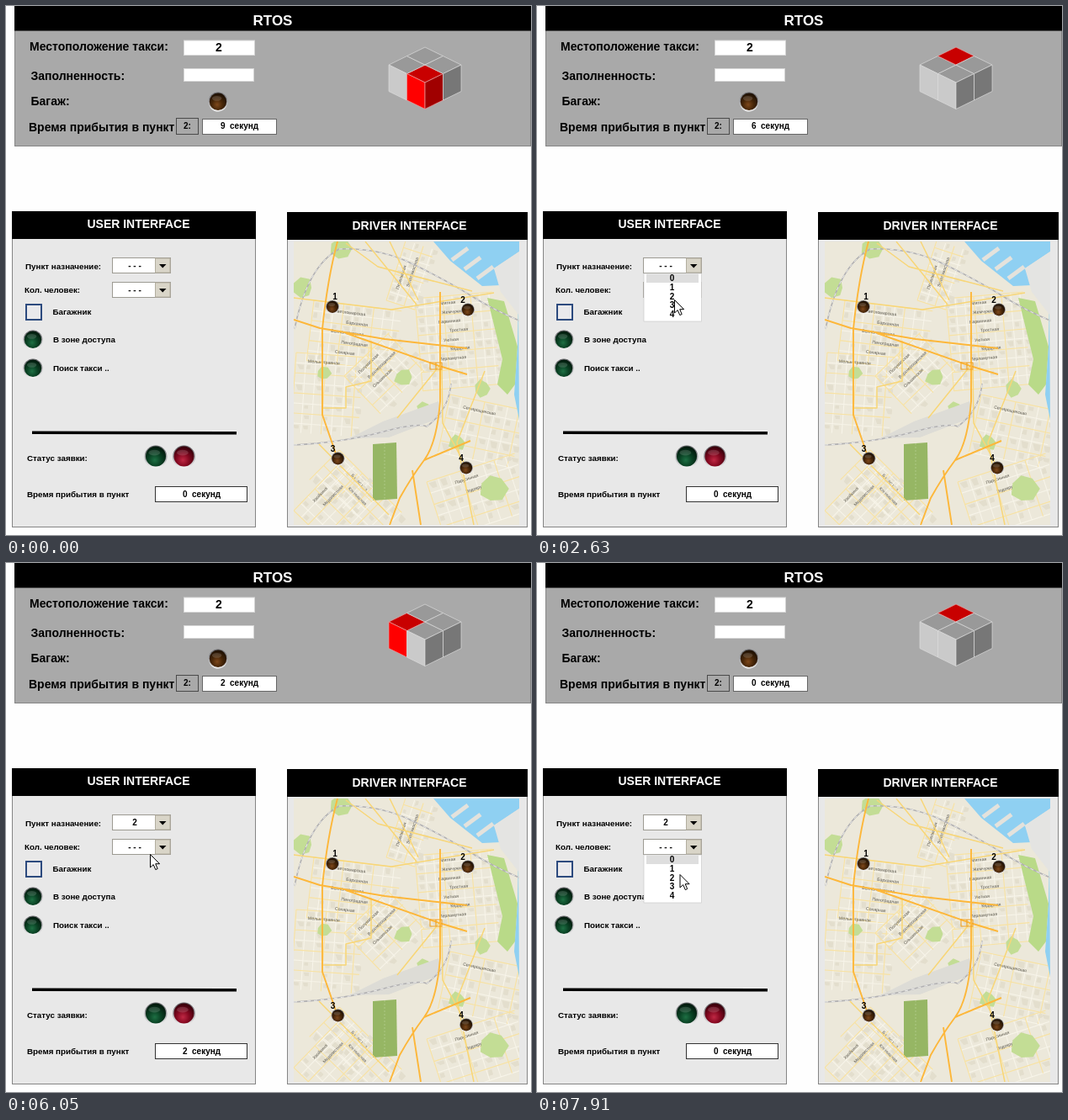
These frames come from a looping animation (624 by 629 pixels, 8 s). An HTML page:

```html
<!DOCTYPE html>
<html lang="ru">
<head>
<meta charset="utf-8">
<title>RTOS</title>
<style>
html, body { margin: 0; width: 100%; height: 100%; overflow: hidden; background: #fefefe; }
svg { display: block; width: 624px; height: 629px; }
text { font-family: "Liberation Sans", Arial, sans-serif; font-weight: bold; white-space: pre; }
#map text { font-weight: normal; font-size: 5.2px; fill: #5c594f; }
#map path { stroke-linejoin: round; }
</style>
</head>
<body>
<svg viewBox="0 0 624 629" xmlns="http://www.w3.org/2000/svg">
  <defs id="defs">
    <clipPath id="mapBox"><rect x="342" y="280" width="268" height="337"/></clipPath>
    <linearGradient id="rim" x1="0" y1="0" x2="0" y2="1">
      <stop offset="0" stop-color="#606064"/><stop offset=".5" stop-color="#a4a4a8"/><stop offset="1" stop-color="#f4f4f4"/>
    </linearGradient>
  </defs>
  <g id="panels"></g>
  <g id="map" clip-path="url(#mapBox)"></g>
  <g id="widgets"></g>
  <g id="cube" stroke-width=".7" stroke-linejoin="round"></g>
  <g id="lists"></g>
  <circle id="click" r="12.5" fill="#f7ea1c" opacity=".72"/>
  <path id="arrow" d="M.5 .5V16L4.2 12.6 6.8 18.6 9.2 17.5 6.7 11.7H11.6Z" fill="#fff" stroke="#000"/>
</svg>
<script>
const $ = id => document.getElementById(id);

function add(parent, tag, attrs, text) {
  const el = document.createElementNS('http://www.w3.org/2000/svg', tag);
  for (const k in attrs) el.setAttribute(k, attrs[k]);
  if (text !== undefined) el.textContent = text;
  parent.appendChild(el);
  return el;
}
const box = (p, x, y, width, height, fill, stroke = 'none', sw = 1) =>
  add(p, 'rect', { x, y, width, height, fill, stroke, 'stroke-width': sw });
const label = (p, x, y, size, str, anchor = 'start', fill = '#000') =>
  add(p, 'text', { x, y, 'font-size': size, 'text-anchor': anchor, fill }, str);
const shape = (p, points, fill) => add(p, 'polygon', { points, fill });
const line = (p, d, stroke, width, dash = 'none') =>
  add(p, 'path', { d, fill: 'none', stroke, 'stroke-width': width, 'stroke-dasharray': dash });

// Lamps
const lampColors = {
  brown: ['#7d481c', '#472608', '#211204'],
  green: ['#1e7044', '#0a4224', '#031c0e'],
  red: ['#c02844', '#840820', '#3c000c']
};
for (const id in lampColors) {
  const g = add($('defs'), 'radialGradient', { id, cx: .45, cy: .68, r: .62 });
  lampColors[id].forEach((c, i) => add(g, 'stop', { offset: i / 2, 'stop-color': c }));
}
function lamp(p, cx, cy, r, color) {
  add(p, 'circle', { cx, cy, r, fill: 'url(#rim)' });
  add(p, 'circle', { cx, cy: cy - r * .03, r: r * .89, fill: `url(#${color})` });
  add(p, 'ellipse', { cx: cx - r * .12, cy: cy - r * .36, rx: r * .5, ry: r * .25, fill: '#fff', opacity: .15 });
}

// Panels
const panels = $('panels');
function panel(x, y, w, h, bar, fill, size, title, tx, ty) {
  box(panels, x + .5, y + .5, w - 1, h - 1, fill, '#858585');
  box(panels, x, y, w, bar, '#000');
  label(panels, tx, ty, size, title, 'middle', '#fff');
}
panel(10, 0, 614, 167, 29.5, '#a9a9a9', 17, 'RTOS', 317, 23);
panel(7, 244, 290, 376, 33, '#e8e8e8', 14, 'USER INTERFACE', 157.5, 264);
panel(334, 245, 286, 375, 33, '#e8e8e8', 14, 'DRIVER INTERFACE', 479.5, 266);

// City map
const map = $('map');
let seed = 7;
const rnd = (lo = 0, hi = 1) => lo + (hi - lo) * (seed = seed * 16807 % 2147483647) / 2147483647;

box(map, 342, 280, 268, 337, '#ece8da');

// A district: house blocks, white lanes, a few yellow streets and their names
function district(x, y, w, h, angle, step, names) {
  const g = add(map, 'g', { transform: `translate(${x} ${y}) rotate(${angle})` });
  let blocks = '', lanes = '', streets = '';
  for (let i = 0; i <= w; i += step) {
    for (let j = 0; j < h; j += step)
      if (rnd() < .6) blocks += `M${i + 2} ${j + 2}h${step * rnd(.3, .7)}v${step * rnd(.3, .6)}h${-step * .4}z`;
    if (i % (step * 3)) lanes += `M${i} 0V${h}`;
    else streets += `M${i} 0V${h}`;
  }
  for (let j = 0; j <= h; j += step) {
    if (j % (step * 2)) lanes += `M0 ${j}H${w}`;
    else streets += `M0 ${j}H${w}`;
  }
  add(g, 'path', { d: blocks, fill: '#e3decd' });
  line(g, lanes, '#f8f5ea', 1);
  line(g, streets, '#f8e2a2', 1.1);
  names.split(' ').forEach((s, i) => label(g, w * .42 + i % 2 * 10, step * (i + 1) - 1, 5, s, 'middle'));
}
district(486, 348, 92, 110, -5, 11, 'Мятная Жемчужинская Барвинная Тростная Уютная Кедарная Перламутная');
district(366, 350, 105, 72, 7, 12, 'Светломарская Барханная Волнолетовская Пеноградная Сонярная');
district(452, 350, 75, 36, -72, 11, 'Переливная Золотомостная');
district(345, 412, 80, 95, 4, 12, 'Мельнотравная');
district(402, 440, 74, 62, -44, 12, 'Полумарская Верхнерощинская Ольшинская');
district(396, 528, 105, 50, 45, 13, 'Берестная Клёнышная');
district(342, 600, 84, 60, -46, 12, 'Хвойкина Медолистная');
district(528, 462, 90, 70, 12, 14, 'Семирощинская');
district(500, 566, 110, 70, -18, 14, 'Парусинная Водокрутная');

// Parks
function park(x, y, r) {
  const points = Array.from({ length: 7 }, (_, i) => {
    const a = i / 7 * Math.PI * 2, d = r * rnd(.75, 1.15);
    return `${x + d * Math.cos(a)},${y + d * Math.sin(a)}`;
  });
  shape(map, points.join(' '), '#c3dd95');
}
[[398, 288, 12], [353, 335, 13], [472, 441, 11], [377, 437, 9], [497, 480, 9], [566, 455, 11], [536, 519, 10], [579, 574, 17]]
  .forEach(p => park(...p));
shape(map, '572,347 592,351 608,405 605,450 596,462 584,450 590,420', '#b9da88');
shape(map, '436,521 464,519 465,586 436,588', '#96b664');
line(map, 'M450 520V587', '#aec886', 1, '2 2');

// Harbour
shape(map, '508,280 610,280 610,292 580,312 588,332 566,333 528,303', '#8fd0f2');
shape(map, '609,345 610,492 604,462 608,405', '#8fd0f2');
shape(map, '580,312 610,292 610,368 588,340', '#e4e4e2');
for (let i = 0; i < 3; i++) line(map, `M${530 + i * 15} ${302 + i * 11}l19 -14`, '#e4e2dc', 5);

// Railway and main roads
shape(map, '408,514 448,494 514,470 518,489 455,513', '#dddcd6');
const rail = 'M343 384Q358 309 396 289Q443 287 484 307T552 344T610 374M342 522Q400 519 445 507T500 500Q526 481 529 449';
line(map, rail, '#b2b1b3', 1.6);
line(map, rail, '#f6f6f4', .9, '4 4');
line(map, 'M427 280L488 355M456 280L490 350M342 347L458 361L580 341M404 282L442 310L554 339M518 432L519 496L548 550' +
  'M515 428L465 490M434 398V446L404 453V478H376M569 434L536 519L556 617M372 521L455 605', '#f8d677', 1.5);
line(map, 'M394 280Q382 325 376 384V486L394 538M342 373L373 383L450 396L548 407M404 389L515 428L548 438' +
  'M516 340V470Q512 520 497 540T468 585L456 617M483 552L493 617M497 540L552 517', '#fdb73a', 1.9);
line(map, 'M504 424h14v8h-14zM511 424v8', '#f0a01e', 1.1);

// Controls
const ui = $('widgets');
[[388, 358, 1], [549, 361.5, 2], [394.5, 538.5, 3], [547, 549.5, 4]].forEach(([x, y, n]) => {
  lamp(ui, x, y, 8, 'brown');
  label(ui, x - (n === 1 ? -3 : 6), y - 9, 10, n, 'middle');
});

label(ui, 28, 53, 14, 'Местоположение такси:');
label(ui, 29.5, 88, 14, 'Заполненность:');
label(ui, 29.5, 118, 14, 'Багаж:');
label(ui, 27, 149, 14, 'Время прибытия в пункт');
box(ui, 211.5, 41, 84, 17.5, '#fff', '#d6d6d6');
label(ui, 253, 53.5, 14, '2', 'middle');
box(ui, 211.5, 74.5, 83, 15, '#fff', '#d6d6d6');
lamp(ui, 252, 114, 11.5, 'brown');
box(ui, 202.5, 133.5, 26, 19, '#a9a9a9', '#4a4a4a');
label(ui, 215.5, 146, 10, '2:', 'middle');
box(ui, 233.5, 134.5, 88, 18, '#fff', '#666');

label(ui, 23, 313, 9.8, 'Пункт назначение:');
label(ui, 22, 341, 9.8, 'Кол. человек:');
label(ui, 55.5, 367, 9.8, 'Багажник');
label(ui, 56, 400, 9.8, 'В зоне доступа');
label(ui, 56, 434, 9.8, 'Поиск такси ..');
label(ui, 25, 541, 9.8, 'Статус заявки:');
label(ui, 25, 584, 9.8, 'Время прибытия в пункт');
box(ui, 24, 355, 18, 18, '#e9e9ec', '#2c4a7e', 2);
lamp(ui, 32, 397, 11.5, 'green');
lamp(ui, 32, 431, 11.5, 'green');
lamp(ui, 178, 536, 13.5, 'green');
lamp(ui, 211.5, 536, 13.5, 'red');
shape(ui, '31,505.5 274,506 274,509.5 31,509', '#000');
box(ui, 177.5, 571.5, 109, 18, '#fff', '#333');

function combo(y) {
  box(ui, 126.5, y + .5, 69, 18, '#fff', '#9c9a92');
  box(ui, 177.5, y + 1, 17.5, 17, '#d9d5c8', '#b3ae9f');
  shape(ui, `182,${y + 8} 190.5,${y + 8} 186.2,${y + 12.5}`, '#000');
  return label(ui, 153, y + 13, 10, '- - -', 'middle');
}
function menu(y) {
  const g = add($('lists'), 'g', {});
  box(g, 127, y, 68.5, 57, '#fff', '#c4c4c4', .6);
  box(g, 130, y + .5, 62, 10.5, '#dedede');
  for (let i = 0; i < 5; i++) label(g, 160.5, y + 9 + i * 10.8, 10, i, 'middle');
  return g;
}
const place = combo(299);
combo(328);
const placeMenu = menu(318), peopleMenu = menu(347);
const taxiTime = label(ui, 277.5, 146, 10, '', 'middle');
const userTime = label(ui, 232.5, 584, 10, '', 'middle');

// Cube: pieces light up in the order front, left, back, right
const W = 21.5, H = 10.5, D = 31.5;
const sides = {
  top: { grey: '#999', lit: '#c80000', d: `l${W} ${H} ${-W} ${H} ${-W} ${-H}z` },
  left: { grey: '#cacaca', lit: '#f00', d: `l${W} ${H}v${D}l${-W} ${-H}z` },
  right: { grey: '#777', lit: '#a00000', d: `l${W} ${-H}v${D}l${-W} ${H}z` }
};
// side, piece, and start measured in half-widths from the centre of the top
const faces = [
  ['top', 0, 0, 0], ['top', 1, -1, -1], ['top', 2, 0, -2], ['top', 3, 1, -1],
  ['left', 1, -2, 0], ['left', 0, -1, 1], ['right', 0, 0, 2], ['right', 3, 1, 1]
].map(([side, piece, i, j]) => ({
  ...sides[side], piece,
  el: add($('cube'), 'path', { d: `M${498 + i * W} ${70 + j * H}${sides[side].d}` })
}));

// Timeline
const LOOP = 8000, SECOND = 988, TURN = 1200;
const OPEN_PLACE = 1660, PICK_PLACE = 5640, OPEN_PEOPLE = 6840, CLICK = 160;

// Cursor: start and end time of each move, then where it ends
const moves = [
  [200, 770, 247, 328], [770, 960, 241, 325], [1090, 1500, 181, 308], [1990, 2600, 163, 349], [2910, 4110, 170, 354],
  [5080, 5180, 171, 346], [6050, 6640, 183.5, 334], [7120, 7480, 169, 374], [7480, 7680, 169.5, 370]
];
function cursorAt(t) {
  let x = 259, y = 629;
  for (const [from, to, mx, my] of moves) {
    const k = Math.min(1, Math.max(0, (t - from) / (to - from)));
    const e = k * k * (3 - 2 * k);
    x += (mx - x) * e;
    y += (my - y) * e;
  }
  return [x, y];
}
const show = (el, on) => el.setAttribute('visibility', on ? 'visible' : 'hidden');
const during = (t, a, b) => t >= a && t < b;

function draw(t) {
  const left = 9 - (t >= 200) - Math.floor(t / SECOND);
  const picked = t >= PICK_PLACE;
  taxiTime.textContent = `${left}  секунд`;
  userTime.textContent = `${picked ? left : 0}  секунд`;
  place.textContent = picked ? '2' : '- - -';
  show(placeMenu, during(t, OPEN_PLACE, PICK_PLACE));
  show(peopleMenu, t >= OPEN_PEOPLE);

  const active = Math.floor((t + 360) / TURN) % 4;
  for (const f of faces) {
    const on = f.piece === active;
    f.el.setAttribute('fill', on ? f.lit : f.grey);
    f.el.setAttribute('stroke', on ? '#e8a0a0' : '#dcdcdc');
  }

  const [x, y] = cursorAt(t);
  $('arrow').setAttribute('transform', `translate(${x} ${y})`);
  $('click').setAttribute('cx', x);
  $('click').setAttribute('cy', y + .5);
  show($('arrow'), t >= 200);
  show($('click'), [OPEN_PLACE, PICK_PLACE].some(end => during(t, end - CLICK, end)));
}

const start = performance.now();
function frame() {
  draw((performance.now() - start) % LOOP);
  requestAnimationFrame(frame);
}
frame();
</script>
</body>
</html>
```
